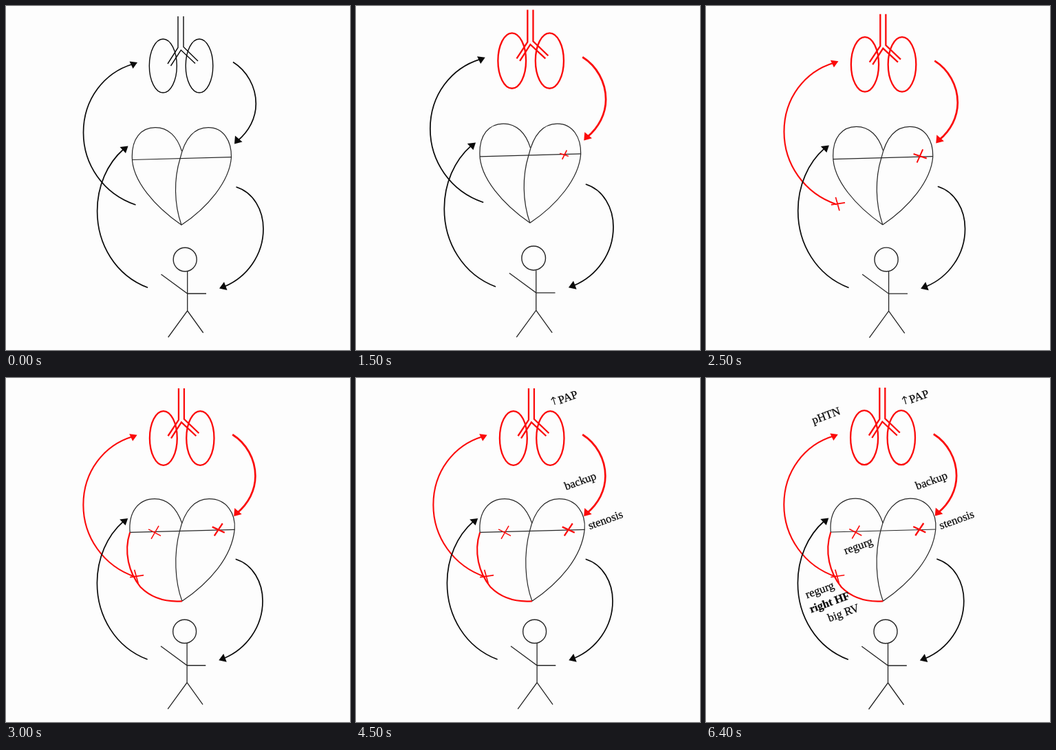
An HTML page with a canvas for the animation above (7.43 s loop, 500 by 500 pixels).

```html
<!DOCTYPE html>
<html lang="en">
<head>
<meta charset="utf-8">
<title>Circulation diagram</title>
<style>
  html, body { margin: 0; width: 100%; height: 100%; overflow: hidden; background: #fdfdfd; }
  canvas { display: block; width: 100vw; height: 100vh; }
</style>
</head>
<body>
<canvas id="stage"></canvas>
<script>
const canvas = document.getElementById('stage');
const ctx = canvas.getContext('2d');
const SIZE = 500, LOOP = 7430;
const BLACK = '#0a0a0a', INK = '#262626', RED = '#fb0a0a';
const TILT = -20 * Math.PI / 180;

// Start time and the slight scale and shift of each drawing.
const steps = [
  [0, 1, 0, 0],
  [500, 0.999, 0.2, -0.2],
  [1000, 0.999, 0.3, -0.3],
  [1500, 1.018, -6.7, -8.7],
  [2000, 0.999, 1, 0],
  [2500, 1.006, 0.3, -2.3],
  [3000, 0.997, 0.2, 1],
  [3500, 0.997, 0.2, 1],
  [4000, 0.997, 0.2, 1],
  [4500, 0.997, 0.2, 1],
  [5000, 1, 0, 0],
  [5500, 1, 0, 0],
  [6400, 1, 0.8, 0]
];

function line(d, color, width) {
  ctx.strokeStyle = color;
  ctx.lineWidth = width;
  ctx.stroke(new Path2D(d));
}

function oval(x, y, rx, ry, color, width) {
  ctx.strokeStyle = color;
  ctx.lineWidth = width;
  ctx.beginPath();
  ctx.ellipse(x, y, rx, ry, 0, 0, Math.PI * 2);
  ctx.stroke();
}

function arrow(d, head, color, width) {
  line(d, color, width);
  ctx.fillStyle = color;
  ctx.fill(new Path2D(head + 'Z'));
}

function label(str, x, y, bold = false) {
  ctx.save();
  ctx.translate(x, y);
  ctx.rotate(TILT);
  ctx.font = (bold ? 'bold 16.3px' : '16.7px') + ' "Liberation Serif", "Times New Roman", serif';
  ctx.fillStyle = ctx.strokeStyle = BLACK;
  ctx.lineWidth = 0.25;
  ctx.fillText(str, 0, 0);
  ctx.strokeText(str, 0, 0);
  ctx.restore();
}

function lungs(red) {
  if (red) {
    oval(229.3, 86.7, 20, 39.5, RED, 2.3);
    oval(283, 86.7, 20.2, 39.5, RED, 2.3);
    line('M251.5 14V60L236 83.5M259.5 14V59L281 79.5M240.5 87L255.5 63.5L277 83.5', RED, 2.3);
  } else {
    oval(228.3, 87, 20, 39, BLACK, 1.4);
    oval(281, 87, 19.8, 39, BLACK, 1.4);
    line('M250 15V60.5L235 84M258 15V59.5L279 80M239.5 87L254.3 64L275 83.5', BLACK, 1.4);
  }
}

function heart(big) {
  if (big) {
    line('M180.5 224C178 193 194 175.2 216.5 175.2C236 175.2 249 190 256.5 211', INK, 1.2);
    line('M256.5 324.3C246 296 244 256 253 222C260 192 275 175.2 296 175.2C321 175.2 335 196 333 220C329 260 297 297 256.5 324.3', INK, 1.2);
    line('M180.5 224L333 220', INK, 1.2);
    line('M180.5 224C171 253 179 283 196 304C212 320 232 326 256.5 324.3', RED, 2.2);
  } else {
    line('M255 318.3C217 292 183 254 183.3 219C183 193 196 176.6 217 176.6C236 176.6 249 190 255.5 211', INK, 1.2);
    line('M255 318.3C244 287 244 251 253 222C260 192 274 176.6 294 176.6C316 176.6 328 196 327.5 220C325 255 293 293 255 318.3', INK, 1.2);
    line('M183.3 223.5L327.5 219.7', INK, 1.2);
  }
}

function person() {
  oval(260.2, 368.5, 17, 17.2, INK, 1.4);
  line('M263.7 386V443L235.7 481.5M263.7 443L286.7 475M225.5 390L263.7 418H291', INK, 1.3);
}

function draw(step) {
  const flooded = step >= 5;
  const backup = step >= 2;

  lungs(step >= 3);
  heart(step >= 6);
  person();

  arrow('M188.5 289C141 273 112.5 230 112.5 184C112.5 135 143 97 184 84.5',
    'M191 82L179.5 80.5L184.5 91', flooded ? RED : BLACK, flooded ? 2.1 : 1.7);
  arrow('M206 409.3C159 391.5 132.6 346 132.6 298C132.6 262 147 229 171 208',
    'M177.5 203.5L165.5 205L174 214', BLACK, 1.7);
  arrow('M330 81.5C350 94 363.3 117 363.3 142C363.3 163 353 182 337 195.5',
    'M332 200.5L333 188.5L343.5 197.5', backup ? RED : BLACK, backup ? 2.7 : 1.7);
  arrow('M334.5 263C360 271 374 297 374 324C374 362 350 394 318 407.5',
    'M310 410.5L317 401L321.5 413', BLACK, 1.7);

  // Valve marks
  if (step >= 6) line('M300.5 216L318.5 224.5M315.5 211L303.5 229', RED, 2.3);
  else if (step >= 4) line('M299.5 216L318.5 222.5M313 209.5L304.5 228.5', RED, 2);
  else if (step >= 1) line('M297.5 219L310 223M307.5 214.5L301 227.5', RED, 1.6);
  if (flooded) line('M180.5 289.5L200.5 286.5M187 278.5L192.5 298', RED, 1.7);
  if (step >= 6) line('M207.5 219.5L225.5 229M222.5 214.5L211.5 233.5', RED, 1.5);

  if (step >= 7) label('stenosis', 340.5, 220);
  if (step >= 8) label('backup', 306, 162.5);
  if (step >= 9) {
    line('M290 38L286.8 27M284.4 31.2L286.8 27L291 29.2', BLACK, 1.1);
    label('PAP', 297, 37);
  }
  if (step >= 10) label('pHTN', 155.5, 67);
  if (step >= 11) {
    label('regurg', 202, 256.5);
    label('regurg', 146, 320.5);
    label('big RV', 178.5, 354.5);
  }
  if (step >= 12) label('right HF', 152, 341.5, true);
}

function render(now) {
  const ratio = devicePixelRatio || 1;
  const w = Math.round(innerWidth * ratio), h = Math.round(innerHeight * ratio);
  if (canvas.width !== w || canvas.height !== h) {
    canvas.width = w;
    canvas.height = h;
  }
  const t = now % LOOP;
  const step = steps.filter(s => s[0] <= t).length - 1;
  const [, scale, dx, dy] = steps[step];

  ctx.setTransform(w / SIZE, 0, 0, h / SIZE, 0, 0);
  ctx.fillStyle = '#fdfdfd';
  ctx.fillRect(0, 0, SIZE, SIZE);
  ctx.translate(dx, dy);
  ctx.scale(scale, scale);
  draw(step);
}

const start = performance.now();
function tick() {
  render(performance.now() - start);
  requestAnimationFrame(tick);
}
tick();
</script>
</body>
</html>
```
